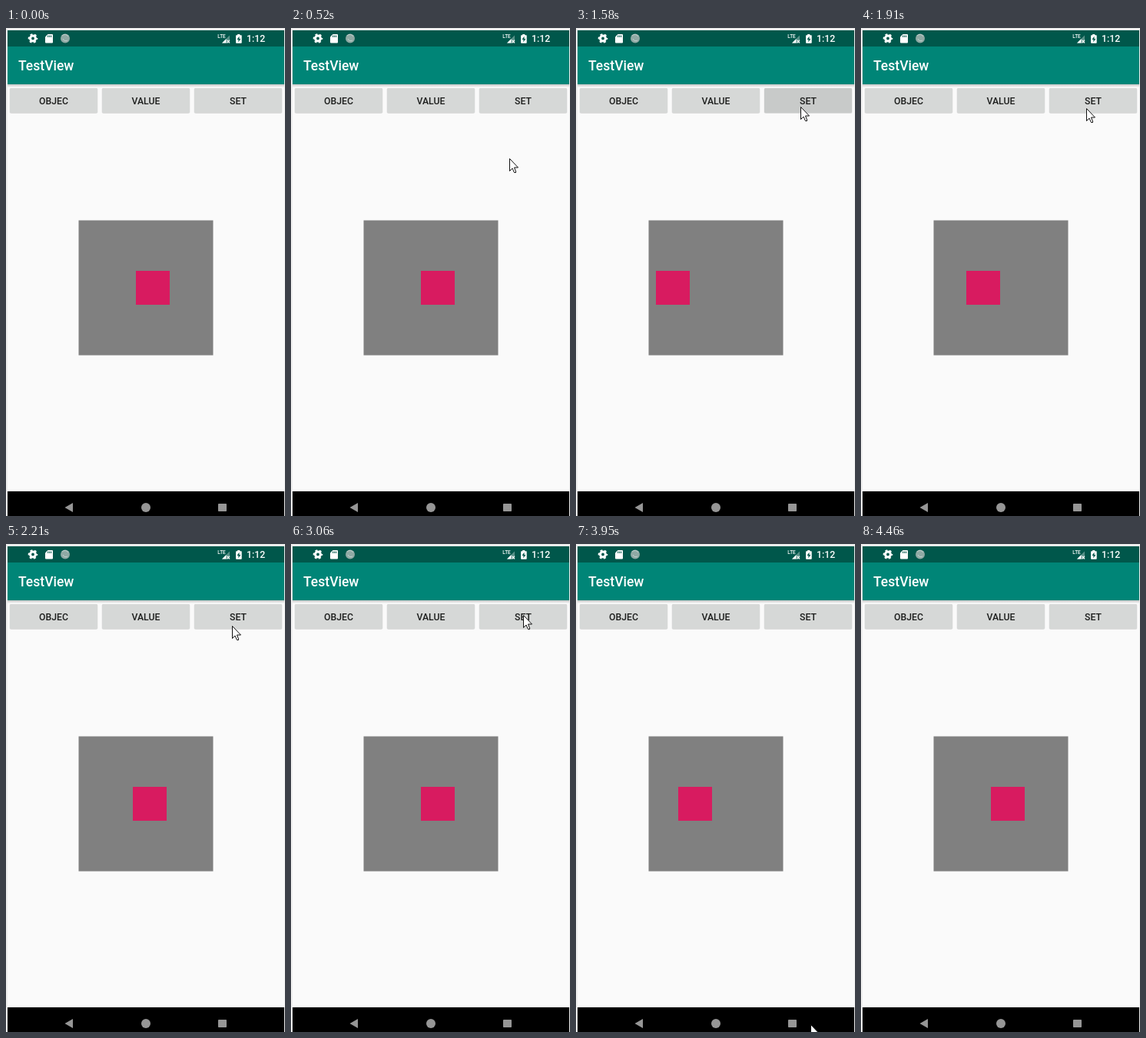
Recreate the animation shown at these times as an HTML page. Size 363 by 633 pixels, loop 5140 ms.

```html
<!DOCTYPE html>
<html lang="en">
<head>
<meta charset="utf-8">
<title>TestView</title>
<style>
  html, body { margin: 0; width: 100%; height: 100%; overflow: hidden; background: #ededed; }
  svg { display: block; width: 363px; height: 633px; }
  text { font-family: Roboto, sans-serif; font-weight: 500; }
  .label { font-size: 12.26px; text-anchor: middle; fill: #1e1f1e; }
</style>
</head>
<body>
<svg viewBox="0 0 363 633">
  <defs>
    <linearGradient id="shade" x2="0" y2="1">
      <stop stop-color="#c4c4c4"/>
      <stop offset="1" stop-color="#fafafa"/>
    </linearGradient>
    <clipPath id="setClip"><rect x="245" y="78" width="114" height="32" rx="1.8"/></clipPath>
  </defs>

  <rect x="2" y="3" width="360" height="630" fill="#fafafa"/>
  <rect x="2" y="3" width="360" height="21" fill="#00574b"/>
  <rect x="2" y="24" width="360" height="49" fill="#008577"/>
  <rect x="2" y="73" width="360" height="4" fill="url(#shade)"/>
  <text x="16" y="55" font-size="17.5" fill="#fff">TestView</text>

  <!-- status bar -->
  <g fill="#fff">
    <circle cx="35" cy="13.5" r="3.4" fill="none" stroke="#fff" stroke-width="3"/>
    <circle cx="35" cy="13.5" r="5.3" fill="none" stroke="#fff" stroke-width="2"
            stroke-dasharray="2.8 2.75" stroke-dashoffset="1.4"/>
    <path d="M54.5 8H60q1 0 1 1V18.5q0 1-1 1H52q-1 0-1-1V11.5Z"/>
    <path d="M54.7 9.5v2.5M56.7 9.5v2.5M58.7 9.5v2.5" stroke="#00574b"/>
    <circle cx="77" cy="13.5" r="6" fill="#8fa9a4"/>
    <path d="M73 10a5 5 0 0 1 8 1M74 14a4 4 0 0 0 6 2" fill="none" stroke="#c5d3d0"/>
    <text x="275.3" y="13" font-size="6.5">LTE</text>
    <path d="M281 19.5L291 9.5V19.5Z" opacity=".35"/>
    <path d="M281 19.5L286.5 14V19.5Z"/>
    <path d="M287.5 15.7l3.6 3.6m0-3.6l-3.6 3.6" stroke="#fff" stroke-width="1.2"/>
    <path d="M301.2 8h3v1.2H306q.7 0 .7.7V19q0 .7-.7.7h-6.2q-.7 0-.7-.7V9.9q0-.7.7-.7h1.4Z"/>
    <path d="M303.5 10.8l-3 4.2h1.9v3.2l3-4.3h-1.9Z" fill="#00574b"/>
    <text x="313" y="18" font-size="12.3">1:12</text>
  </g>

  <g id="buttons"></g>
  <circle id="ripple" clip-path="url(#setClip)"/>
  <g id="labels"></g>

  <rect x="94.5" y="249.5" width="175" height="175" fill="#808080"/>
  <rect id="box" y="315" width="44" height="44" fill="#d81b60"/>

  <!-- navigation bar -->
  <rect x="2" y="601" width="360" height="32"/>
  <g fill="#969696">
    <path d="M76.5 622L87 616V628Z"/>
    <circle cx="182" cy="622" r="6"/>
    <rect x="276" y="617" width="11" height="10" rx=".8"/>
  </g>

  <path id="pointer" d="M.5 .5V16.5L4 13L6.5 18.5H8.5V17L6.5 12H11.5Z"
        fill="#fff" stroke="#111" stroke-linejoin="round"/>
</svg>
<script>
const LOOP = 5140;
const REFRESH = 64.2;             // the screen updates in steps of this length
const FIRST_UPDATE = 1320;        // one update, which fixes the phase of all others
const TAPS = [1336, 3425];        // each tap on SET restarts the slide
const SLIDE = 1030;
const LEFT_X = 94, TRAVEL = 75;

// Where the pointer turns or rests: time, x, y
const pointerStops = [
  [50, 316, 612], [520, 284, 163], [1080, 295, 95], [1320, 295, 95], [1580, 292, 102],
  [2210, 294, 106], [2550, 296, 138], [3060, 302, 92], [3600, 302, 92], [3952, 305, 623]];

const byId = id => document.getElementById(id);
const clamp = v => Math.max(0, Math.min(1, v));
const ease = u => (1 - Math.cos(Math.PI * clamp(u))) / 2;

function setAttributes(id, attributes) {
  for (const [name, value] of Object.entries(attributes)) byId(id).setAttribute(name, value);
}

['OBJEC', 'VALUE', 'SET'].forEach((label, i) => {
  const x = 5 + 120 * i;
  byId('buttons').innerHTML += `
    <rect x="${x - .5}" y="78" width="115" height="33" rx="2" opacity=".07"/>
    <rect x="${x}" y="78" width="114" height="32.5" rx="2" opacity=".1"/>
    <rect x="${x}" y="78" width="114" height="32" rx="1.8" fill="#d6d8d7"/>`;
  byId('labels').innerHTML += `<text class="label" x="${x + 57}" y="99">${label}</text>`;
});

function refreshTime(t) {
  return FIRST_UPDATE + Math.floor((t - FIRST_UPDATE) / REFRESH + .25) * REFRESH;
}

function pointerAt(t) {
  const next = pointerStops.findIndex(stop => stop[0] > t);
  if (next < 1) return pointerStops.at(next).slice(1);
  const [t0, x0, y0] = pointerStops[next - 1];
  const [t1, x1, y1] = pointerStops[next];
  const u = ease((t - t0) / (t1 - t0));
  return [x0 + (x1 - x0) * u, y0 + (y1 - y0) * u].map(Math.round);
}

function draw(t) {
  const age = t - (TAPS.findLast(tap => tap <= t) ?? -LOOP);
  const [x, y] = pointerAt(t);
  const visible = t >= pointerStops[0][0] && t < pointerStops.at(-1)[0] + REFRESH / 2;

  setAttributes('box', { x: Math.round(LEFT_X + TRAVEL * ease(age / SLIDE)) });
  setAttributes('pointer', {
    transform: `translate(${x} ${y})`,
    visibility: visible ? 'visible' : 'hidden'
  });
  setAttributes('ripple', {
    cx: x, cy: y,
    r: 75 * clamp(age / 240),
    opacity: .065 * clamp(age / 80) * clamp((480 - age) / 220)
  });
}

const start = performance.now();
function tick() {
  draw(refreshTime((performance.now() - start) % LOOP));
  requestAnimationFrame(tick);
}
tick();
</script>
</body>
</html>
```
